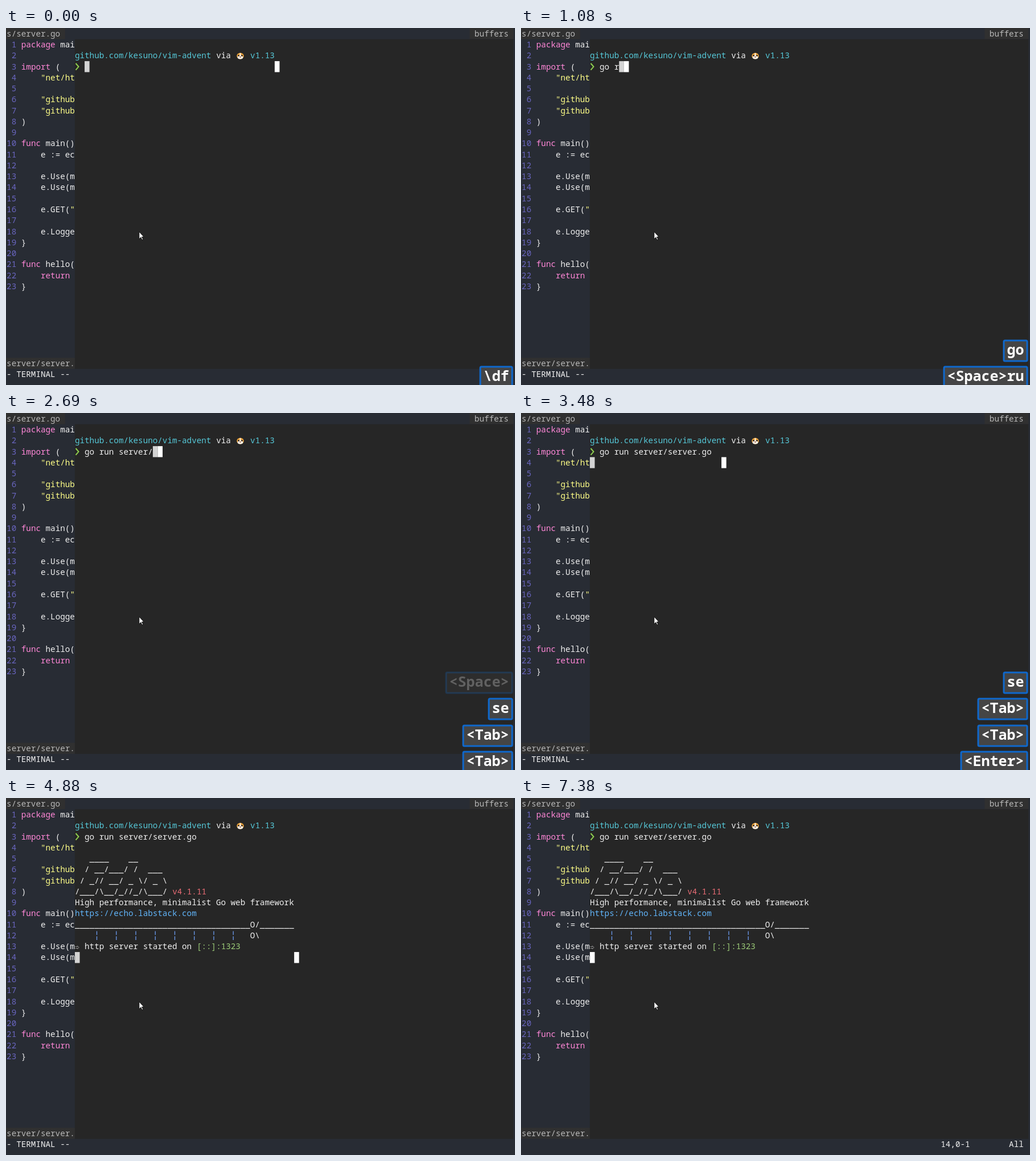
Write an HTML page with a canvas that moves like this. It is 894 by 626 pixels and loops after 8000 ms.

```html
<!DOCTYPE html>
<html lang="en">
<head>
<meta charset="utf-8">
<title>Floating terminal</title>
<style>
html, body { margin: 0; width: 100%; height: 100%; overflow: hidden; background: #282c34; }
canvas { display: block; }
</style>
</head>
<body>
<canvas id="stage" width="894" height="626"></canvas>
<script>
const ctx = document.getElementById('stage').getContext('2d');
const LOOP = 8000, CW = 8.56, RH = 19.27, POP = 14;
const MONO = '"Noto Sans Mono", "DejaVu Sans Mono", monospace';
const C = {
  bg: '#282c34', popup: '#262626', bar: '#303030', barText: '#b8b8b8', num: '#6a66c0',
  text: '#f0f0f0', pink: '#ff87d7', yellow: '#ffff87', cyan: '#56c8d8', green: '#9ccc78',
  prompt: '#8fcf4f', blue: '#61b5fa', guide: '#6c9cf0', red: '#ea6c75',
  grey: '#d3d3d3', white: '#ffffff'
};

const CODE = [
  [['package', C.pink], [' mai']], [], [['import', C.pink], [' (']],
  [['    "net/ht', C.yellow]], [], [['    "github', C.yellow]], [['    "github', C.yellow]],
  [[')']], [], [['func', C.pink], [' main()']], [['    e := ec']], [],
  [['    e.Use(m']], [['    e.Use(m']], [], [['    e.GET('], ['"', C.yellow]], [],
  [['    e.Logge']], [['}']], [], [['func', C.pink], [' hello(']],
  [['    return', C.pink]], [['}']]
];

const BANNER = [
  [['   ____    __']],
  [['  / __/___/ /  ___']],
  [[' / _// __/ _ \\/ _ \\']],
  [['/___/\\__/_//_/\\___/ '], ['v4.1.11', C.red]],
  [['High performance, minimalist Go web framework']],
  [['https://echo.labstack.com', C.blue]],
  [['_'.repeat(36) + 'O/' + '_'.repeat(7)]],
  [[' '.repeat(36) + 'O\\']],
  [['  http server started on '], ['[::]:1323', C.green]]
];

// [start, typed command, key badges from the bottom up, each a text or [text, alpha]]
const RUN = 'go run ', FULL = 'go run server/server.go ';
const STEPS = [
  [0, '', ['\\df']],
  [540, '', ['g', '\\df']],
  [680, 'g', ['go', '\\df']],
  [800, 'go ', ['<Space>r', 'go', ['\\df', .6]]],
  [940, 'go ', ['<Space>r', 'go']],
  [1080, 'go r', ['<Space>ru', 'go']],
  [1220, 'go ru', ['<Space>run', 'go']],
  [1380, RUN, ['<Space>', '<Space>run', 'go']],
  [1810, RUN, ['<Space>', '<Space>run', ['go', .65]]],
  [1990, RUN, ['<Space>', '<Space>run', ['go', .3]]],
  [2120, RUN, ['<Space>', '<Space>run']],
  [2270, RUN, ['s', '<Space>', '<Space>run']],
  [2420, RUN + 's', ['se', '<Space>', ['<Space>run', .6]]],
  [2550, RUN + 'se', ['<Tab>', 'se', ['<Space>', .6], ['<Space>run', .2]]],
  [2690, RUN + 'server/', ['<Tab>', '<Tab>', 'se', ['<Space>', .25]]],
  [2810, FULL, ['<Tab>', '<Tab>', 'se']],
  [3480, FULL, ['<Enter>', '<Tab>', '<Tab>', 'se']],
  [3750, FULL, ['<Enter>', '<Tab>', '<Tab>', ['se', .5]]],
  [3910, FULL, ['<Enter>', '<Tab>', ['<Tab>', .6]]],
  [4050, FULL, ['<Enter>', ['<Tab>', .4], ['<Tab>', .15]]],
  [4180, FULL, ['<Enter>']],
  [4600, FULL, [['<Enter>', .7]]],
  [4750, FULL, [['<Enter>', .3]]],
  [4880, FULL, []],
  [5880, FULL, ['<Ctrl - [>']],
  [7110, FULL, [['<Ctrl - [>', .65]]],
  [7240, FULL, [['<Ctrl - [>', .25]]],
  [7380, FULL, []]
];
const ENTER = 3480, OUTPUT = 4600, NORMAL = 6020;

const colX = c => 1.1 + c * CW;
const rowY = r => .3 + r * RH;

function rect(x, y, w, h, color) {
  ctx.fillStyle = color;
  ctx.fillRect(x, y, w, h);
}

function put(col, row, str, color = C.text) {
  ctx.fillStyle = color;
  ctx.fillText(str, colX(col), Math.round(rowY(row) + 14.4));
}

function line(col, row, spans) {
  for (const [str, color] of spans) {
    put(col, row, str, color);
    col += str.length;
  }
}

function caret(col, row, color) {
  rect(colX(POP + col), rowY(row), CW, RH, color);
}

function shape(points, color) {
  ctx.fillStyle = color;
  ctx.beginPath();
  points.forEach(([x, y]) => ctx.lineTo(x, y));
  ctx.closePath();
  ctx.fill();
}

function oval(x, y, rx, ry, color) {
  ctx.fillStyle = color;
  ctx.beginPath();
  ctx.ellipse(x, y, rx, ry, 0, 0, 7);
  ctx.fill();
}

function stroke(points, width, color) {
  ctx.strokeStyle = color;
  ctx.lineWidth = width;
  ctx.beginPath();
  points.forEach(([x, y]) => ctx.lineTo(x, y));
  ctx.stroke();
}

function editor(normal) {
  rect(0, 0, 894, 626, C.bg);
  rect(0, 0, colX(12), 19.5, C.bar);
  rect(colX(95), 0, 9 * CW, 19.5, C.bar);
  put(0, 0, 's/server.go', C.barText);
  put(96, 0, 'buffers', C.barText);
  CODE.forEach((spans, i) => {
    put(0, i + 1, String(i + 1).padStart(2), C.num);
    line(3, i + 1, spans);
  });
  rect(0, rowY(30), colX(POP), RH, C.bar);
  put(0, 30, 'server/server.', C.barText);
  if (normal) {
    put(86, 31, '14,0-1');
    put(100, 31, 'All');
  } else {
    put(0, 31, '- TERMINAL --');
  }
}

function hamster(x, y) {
  oval(x, y, 6.2, 5.4, '#eea53c');
  oval(x, y + 2.2, 4.8, 3.2, '#fff3e4');
  rect(x - 1, y - 5, 2, 6, '#fff3e4');
  oval(x - 3, y - .6, 1.4, 1.4, '#2c211c');
  oval(x + 3, y - .6, 1.4, 1.4, '#2c211c');
  oval(x, y + 1.8, 1.2, 1, '#7a3d36');
}

function banner() {
  BANNER.forEach((spans, i) => line(POP, 5 + i, spans));
  for (let col = 4; col <= 32; col += 4) {
    const x = colX(POP + col) + CW / 2 - .6, y = rowY(12);
    rect(x, y + 2, 1.3, 6.5, C.guide);
    rect(x, y + 11, 1.3, 6.5, C.guide);
  }
  const grey = '#8a8a8a';
  stroke([[121.5, 260.5], [126, 260.5]], 1, grey);
  stroke([[121.5, 263.5], [126, 263.5]], 1, grey);
  stroke([[125, 259], [128.3, 262], [125, 265]], 1, grey);
}

function terminal(t, typed) {
  rect(colX(POP), rowY(1), 90 * CW, 30 * RH, C.popup);
  line(POP, 2, [['github.com/kesuno/vim-advent', C.cyan], [' via    '], ['v1.13', C.cyan]]);
  hamster(411.5, 49);
  stroke([[122.5, 62], [127.5, 67.8], [122.5, 73.6]], 2, C.prompt);
  put(POP + 2, 3, typed);
  if (t >= OUTPUT) banner();

  if (t >= NORMAL) return caret(0, 14, C.white);
  let row = 3, grey = 2 + typed.length, white = typed ? grey + 1 : 41;
  if (t >= ENTER) [row, grey, white] = t >= OUTPUT ? [14, 0, 45] : [4, 0, 27];
  caret(grey, row, C.grey);
  caret(white, row, C.white);
}

function badge(label, level, alpha) {
  const w = 15 * label.length + 15, x = 891 - w, y = Math.round(592 - level * 46.3);
  ctx.globalAlpha = alpha;
  ctx.beginPath();
  ctx.roundRect(x + 2, y + 2, w - 4, 36, 2);
  ctx.fillStyle = 'rgba(72, 72, 72, .93)';
  ctx.fill();
  ctx.strokeStyle = '#0f68cc';
  ctx.lineWidth = 3;
  ctx.stroke();
  ctx.font = 'bold 25px ' + MONO;
  ctx.fillStyle = C.white;
  ctx.fillText(label, x + 7.5, y + 27);
  ctx.globalAlpha = 1;
}

function pointer() {
  shape([[233.5, 356.5], [233.5, 370.5], [236.7, 367.8], [238.8, 372], [241, 371],
    [239, 366.8], [242.6, 366.4]], '#151515');
  shape([[234.3, 358.3], [234.3, 369], [237, 366.6], [239.2, 371], [240.2, 370.4],
    [238, 366], [241.2, 365.7]], C.white);
}

function draw(t) {
  const [, typed, keys] = STEPS.findLast(s => s[0] <= t);
  ctx.font = '14.267px ' + MONO;
  editor(t >= NORMAL);
  terminal(t, typed);
  pointer();
  keys.forEach((key, i) => {
    const [label, alpha] = Array.isArray(key) ? key : [key, 1];
    badge(label, i, alpha);
  });
}

const start = performance.now();
function frame() {
  draw((performance.now() - start) % LOOP);
  requestAnimationFrame(frame);
}
frame();
</script>
</body>
</html>
```
